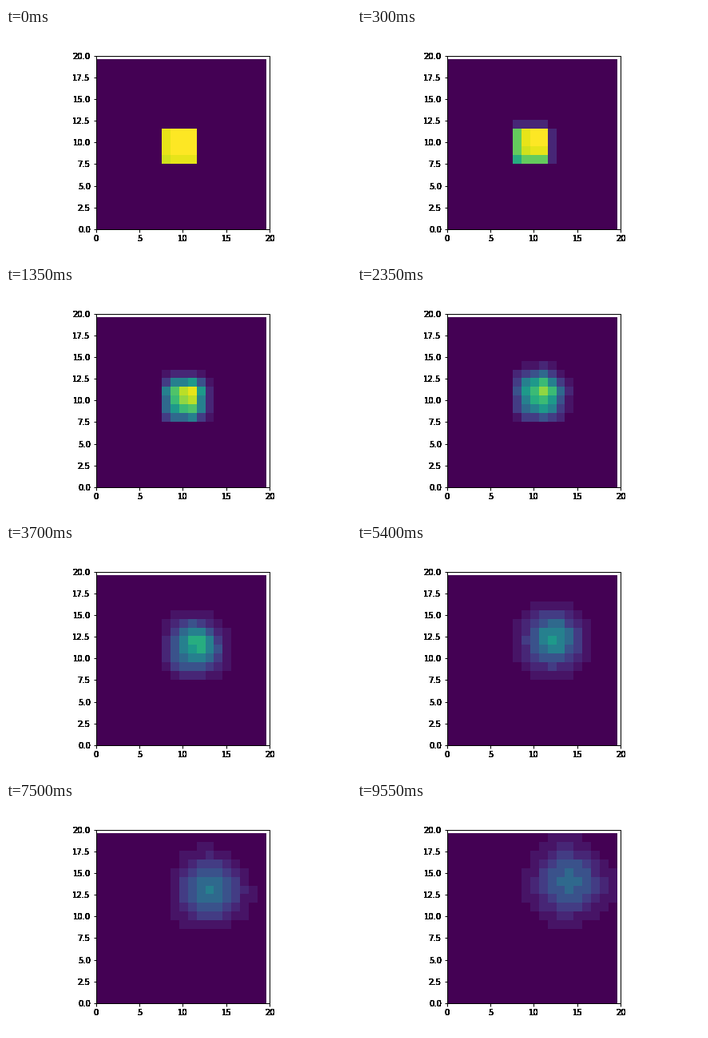
Recreate the animation shown at these times as a matplotlib script. Size 432 by 288 pixels, loop 10 s.

```python
import numpy as np
import matplotlib.pyplot as plt
from matplotlib.animation import FuncAnimation
from matplotlib.colors import ListedColormap

CELLS = 20
STEPS = 200
COURANT = 0.02      # dt / dx
BANDS = 18          # colour steps along viridis
LABEL_COPIES = 16   # stacked labels give hard, heavy glyphs

plt.rcParams.update({
    "font.family": "DejaVu Sans",
    "font.size": 10,
    "axes.linewidth": 1,
    "xtick.major.width": 1,
    "ytick.major.width": 1,
})


def convect(u):
    """One upwind step of u_t + u (u_x + u_y) = 0."""
    new = u.copy()
    mid = u[1:, 1:]
    new[1:, 1:] = mid - COURANT * mid * (2 * mid - u[1:, :-1] - u[:-1, 1:])
    return new


def solve():
    u = np.ones((CELLS, CELLS))
    u[8:12, 8:12] = 2
    fields = []
    for _ in range(STEPS):
        u = convect(u)
        fields.append(u)
    return fields


def banded_viridis():
    """Viridis in steps of equal RGB distance."""
    rgb = plt.get_cmap("viridis")(np.linspace(0, 1, 256))[:, :3]
    hops = np.linalg.norm(np.diff(rgb, axis=0), axis=1)
    arc = np.concatenate([[0], np.cumsum(hops)])
    arc /= arc[-1]
    nearest = np.searchsorted(arc, np.round(arc * BANDS) / BANDS)
    return ListedColormap(rgb[np.minimum(nearest, 255)])


def add_labels(ax, xticks, yticks):
    pad = 7
    x_trans, x_va, x_ha = ax.get_xaxis_text1_transform(pad)
    y_trans, y_va, y_ha = ax.get_yaxis_text1_transform(pad)
    for _ in range(LABEL_COPIES):
        for x in xticks:
            ax.text(x, 0, f"{x:.0f}", transform=x_trans, va=x_va, ha=x_ha)
        for y in yticks:
            ax.text(0, y, f"{y:.1f}", transform=y_trans, va=y_va, ha=y_ha)


fields = solve()

fig = plt.figure(figsize=(6, 4), dpi=72, facecolor="white")
fig.subplots_adjust(left=0.125, right=0.9, bottom=0.125, top=0.88)
ax = fig.add_subplot()
image = ax.imshow(fields[0], cmap=banded_viridis(), vmin=1, vmax=2,
                  origin="lower", interpolation="nearest")
ax.set_xlim(0, 20)
ax.set_ylim(0, 20)

xticks = np.arange(0, 21, 5)
yticks = np.arange(0, 20.1, 2.5)
ax.set_xticks(xticks)
ax.set_yticks(yticks)
ax.tick_params(labelbottom=False, labelleft=False)
add_labels(ax, xticks, yticks)


def update(i):
    image.set_data(fields[i])
    return [image]


anim = FuncAnimation(fig, update, frames=STEPS, interval=50,
                     repeat=True, repeat_delay=0)
plt.show()
```
